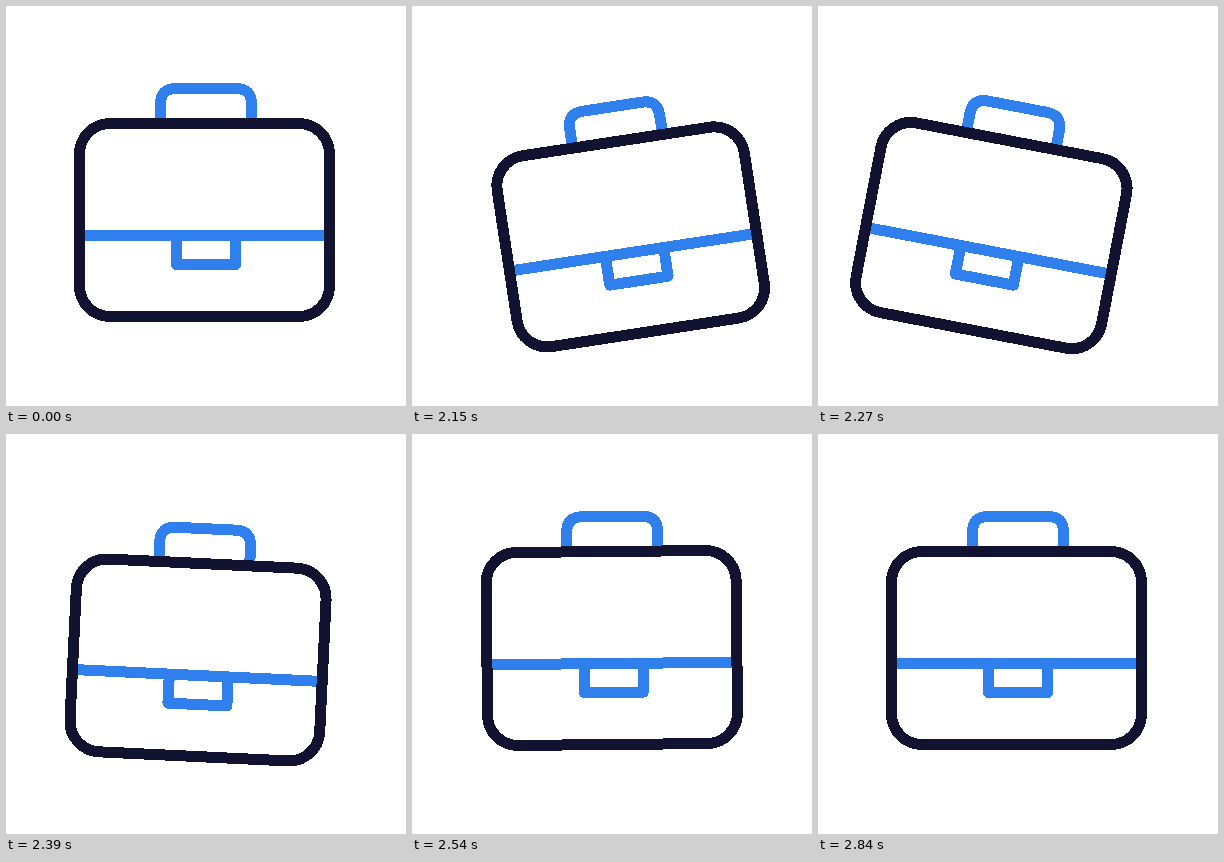
These frames come from a looping animation (400 px wide and 400 px high, 2.87 s). An HTML page:

```html
<!DOCTYPE html>
<html lang="en">
<head>
<meta charset="utf-8">
<title>Briefcase</title>
<style>
  html, body { margin: 0; width: 100%; height: 100%; overflow: hidden; background: #fff; }
  svg { display: block; width: 100vw; height: 100vh; shape-rendering: crispEdges; }
  path, rect { fill: none; stroke-width: 11; stroke-linejoin: round; }
  .accent { stroke: #2f80ec; }
  .body { stroke: #121331; }
</style>
</head>
<body>
<svg viewBox="0 0 400 400">
  <g id="case">
    <path class="accent" d="M154.5 117.5V98Q154.5 82.5 170 82.5H230Q245.5 82.5 245.5 98V117.5"/>
    <path class="accent" d="M73.5 229.5H323.5M170.5 229.5V258.5H229.5V229.5"/>
    <rect class="body" x="73.5" y="117.5" width="250" height="193" rx="30.5"/>
  </g>
</svg>
<script>
  const LOOP = 2870, START = 2030, STEP = 30;
  const PIVOT = '200 80';

  // Turning points of the swing: [ms, degrees]
  const turns = [[2000, 0], [2145, -8.75], [2285, 11.5], [2463, -2.3], [2640, 2], [2840, 0]];

  const smooth = u => u * u * (3 - 2 * u);

  function swing(t) {
    const i = turns.findIndex(([end]) => end > t);
    if (i < 1) return 0;
    const [t0, a] = turns[i - 1], [t1, b] = turns[i];
    return a + (b - a) * smooth((t - t0) / (t1 - t0));
  }

  // Quick dip, slower return
  function dip(t) {
    const depth = 19.2, lowest = 2200;
    const u = (t - lowest) / (t < lowest ? 220 : 315);
    return depth * Math.max(0, 1 - u * u);
  }

  const briefcase = document.getElementById('case');
  const origin = performance.now();

  function draw(now) {
    const time = Math.max(0, now - origin) % LOOP;
    const t = START + Math.floor((time - START) / STEP) * STEP;
    const moving = time >= START;
    const y = moving ? dip(t) : 0;
    const angle = moving ? swing(t) : 0;
    briefcase.setAttribute('transform', `translate(0 ${y}) rotate(${angle} ${PIVOT})`);
    requestAnimationFrame(draw);
  }
  draw(origin);
</script>
</body>
</html>
```
